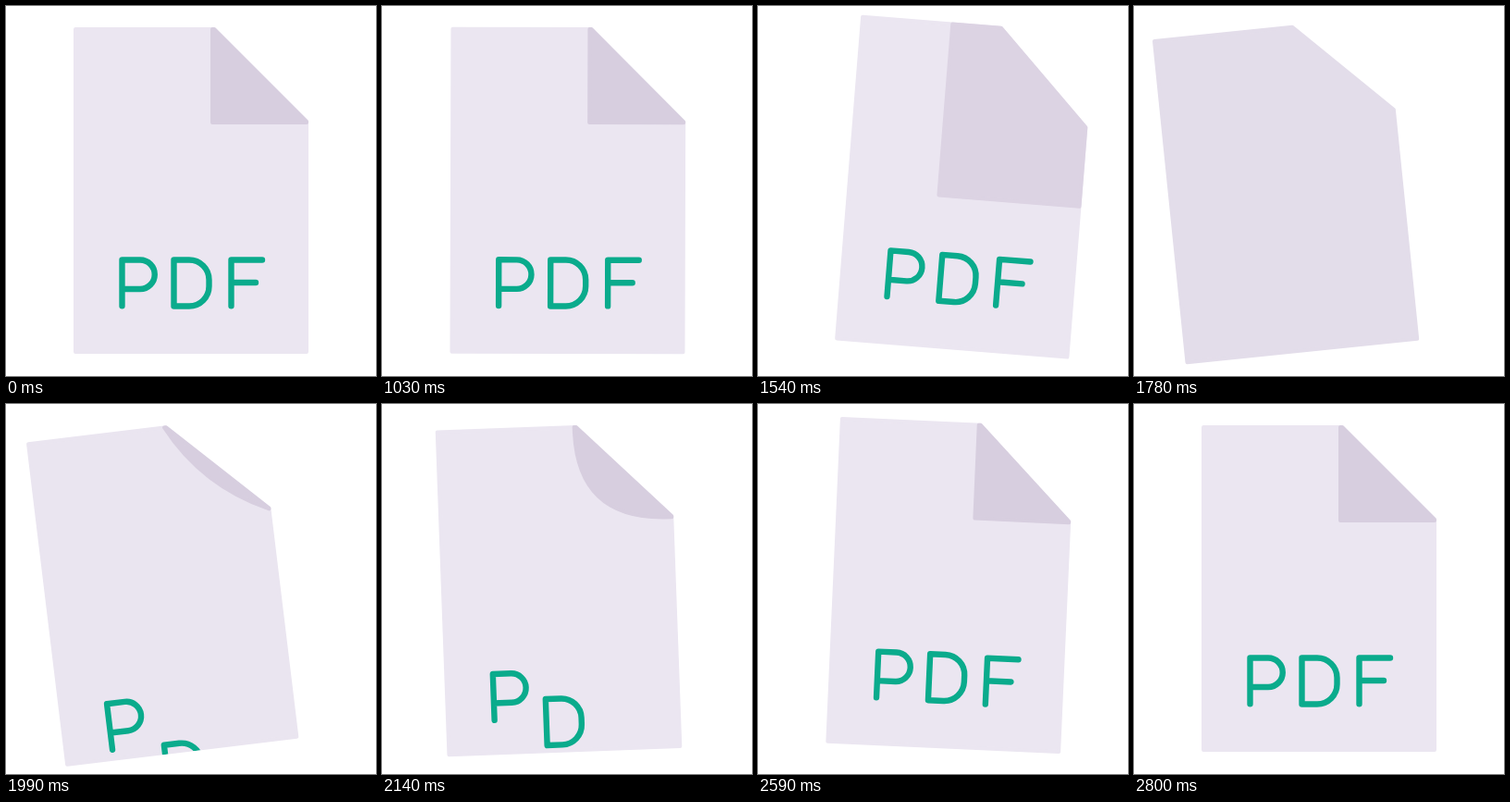
These frames come from a looping animation (400 px wide and 400 px high, 2830 ms). An HTML page:

```html
<!DOCTYPE html>
<html lang="en">
<head>
<meta charset="utf-8">
<title>Page turn</title>
<style>
  html, body { margin: 0; width: 100%; height: 100%; overflow: hidden; background: #fff; }
  svg { display: block; width: 100%; height: 100%; }
  .paper { stroke-width: 4; stroke-linejoin: round; }
  .ink { fill: none; stroke: #0aab8c; stroke-width: 6.4; stroke-linecap: round; stroke-linejoin: round; }
</style>
</head>
<body>
<svg viewBox="0 0 400 400">
  <defs>
    <clipPath id="pageClip"><path d="M73 23H226L327 124V376H73Z"/></clipPath>
  </defs>
  <g id="sheet">
    <path id="page" class="paper" d="M75 25H225L325 125V374H75Z"/>
    <g class="ink" clip-path="url(#pageClip)">
      <path class="letter" d="M125.5 324.3V274.5H145a15.75 15.75 0 0 1 0 31.5H125.5"/>
      <path class="letter" d="M181.5 274.5H198a21.5 21.5 0 0 1 21.5 21.5V303a21.5 21.5 0 0 1 -21.5 21.5H181.5Z"/>
      <path class="letter" d="M243.5 324.3V274.5H277M243.5 299H270"/>
    </g>
    <path id="fold" class="paper"/>
  </g>
</svg>
<script>
const LOOP = 2830, HOLD = 1030, STEP = 30;
const PAGE = [235, 230, 241], FOLD = [215, 206, 223];
const TURNED = 1760; // the flap covers the whole sheet from here on

const swayX = [[1000, 0], [1355, 55], [1825, -38], [1865, -38], [2390, 16], [2790, 0]];
const swayY = [[1355, 0], [1560, -4], [1960, 2], [2060, 2], [2390, -7], [2790, 0]];
const tilt = [[1000, 0], [1355, 9], [1890, -7.5], [1925, -7.5], [2395, 5], [2790, 0]];
const rises = [[1760, 2505], [1925, 2670], [2130, 2745]];

const sheet = document.getElementById('sheet');
const page = document.getElementById('page');
const fold = document.getElementById('fold');
const letters = document.querySelectorAll('.letter');

const mix = (a, b, k) => a + (b - a) * k;
const span = (t, from, to) => Math.min(1, Math.max(0, (t - from) / (to - from)));
const smooth = u => (1 - Math.cos(Math.PI * u)) / 2;
const easeOut = (u, power) => 1 - (1 - u) ** power;

function track(keys, t) {
  const i = keys.findIndex(key => t < key[0]);
  if (i === 0) return keys[0][1];
  if (i < 0) return keys[keys.length - 1][1];
  const [t0, v0] = keys[i - 1], [t1, v1] = keys[i];
  return mix(v0, v1, smooth(span(t, t0, t1)));
}

function paint(node, rgb) {
  const color = `rgb(${rgb.map(Math.round)})`;
  node.setAttribute('fill', color);
  node.setAttribute('stroke', color);
}

// Square flap that grows until it hides the sheet.
function coverPath(t) {
  const grow = smooth(span(t, 1395, TURNED));
  const left = mix(223, 75, grow), bottom = mix(126, 374, grow);
  return `M${left} 25V${bottom}H325V125L225 25Z`;
}

// New corner: bulges out of the cut, then sharpens into a square flap.
function curlPath(t) {
  const out = smooth(span(t, 1890, 2140));
  const sharp = easeOut(span(t, 2130, LOOP), 5);
  const inset = 26 * sharp * (1 - sharp);
  const x = mix(274, 223, out) + inset, y = mix(75.5, 126, out) - inset;
  const startX = mix(223, x, sharp), startY = mix(25, y, sharp);
  const endX = mix(325, x, sharp), endY = mix(126, y, sharp);
  return `M223 25L${startX} ${startY}Q${x} ${y} ${endX} ${endY}L325 126V125L225 25Z`;
}

function draw(t) {
  const turned = t >= TURNED;
  const fade = span(t, 1400, 2020);
  const flapColor = FOLD.map((c, i) => mix(c, PAGE[i], fade));

  sheet.setAttribute('transform',
    `translate(${200 + track(swayX, t)} ${199.5 + track(swayY, t)}) rotate(${track(tilt, t)}) translate(-200 -199.5)`);
  paint(page, turned ? flapColor : PAGE);
  paint(fold, turned ? FOLD : flapColor);
  fold.setAttribute('d', turned ? curlPath(t) : coverPath(t));
  fold.style.display = turned && t < 1890 ? 'none' : '';

  letters.forEach((letter, i) => {
    const drop = turned ? 120 * (1 - easeOut(span(t, ...rises[i]), 3)) : 0;
    letter.setAttribute('transform', `translate(0 ${drop})`);
  });
}

const start = performance.now();
function tick() {
  const t = (performance.now() - start) % LOOP;
  draw(t < HOLD ? 0 : HOLD + STEP * Math.floor((t - HOLD) / STEP));
  requestAnimationFrame(tick);
}
tick();
</script>
</body>
</html>
```
